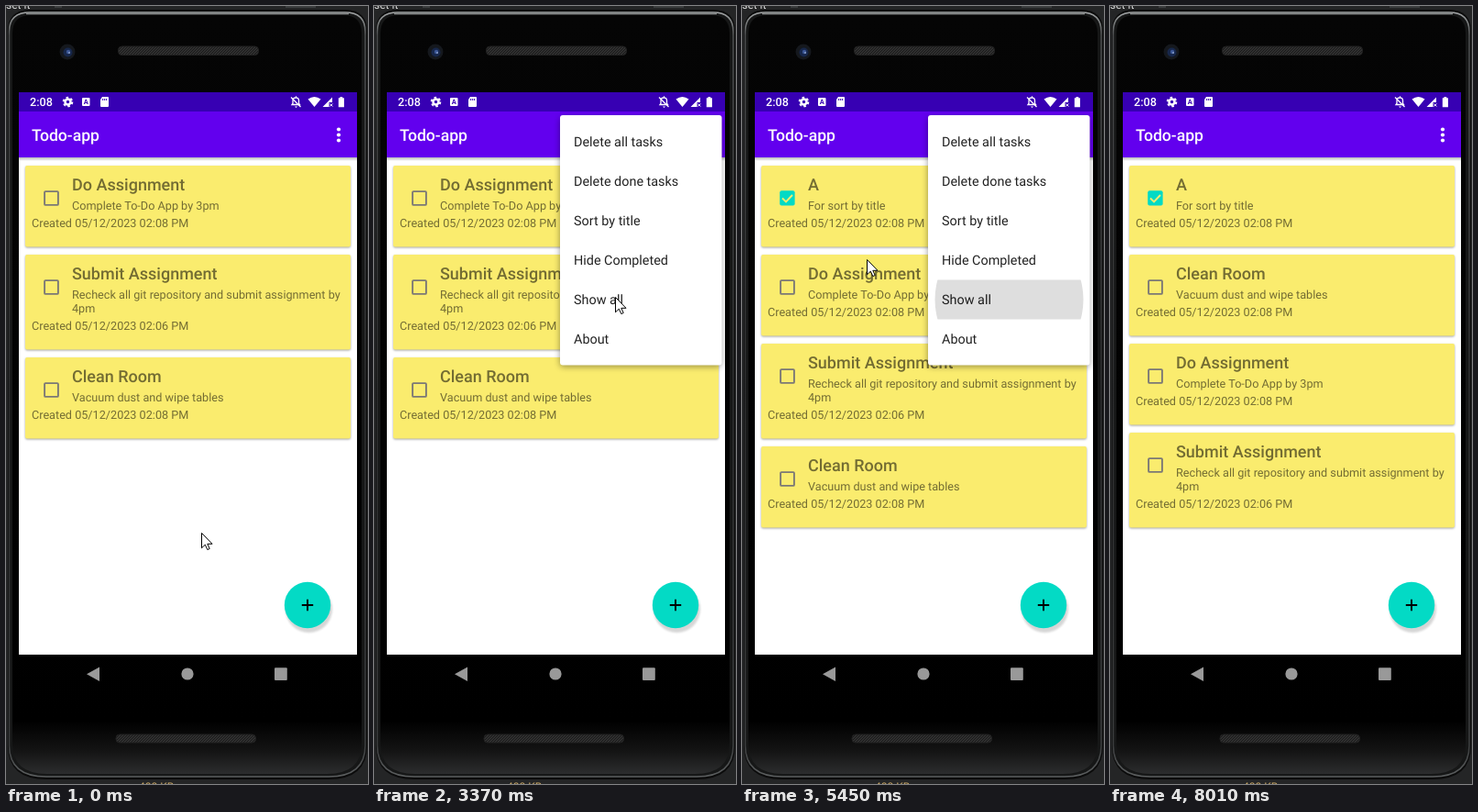
An HTML page for the animation above (8.29 s loop, 395 by 848 pixels).

```html
<!DOCTYPE html>
<html lang="en">
<head>
<meta charset="utf-8">
<title>Todo list</title>
<style>
html, body { margin: 0; width: 100%; height: 100%; overflow: hidden; background: #242526; }
svg { font-family: Roboto, sans-serif; text-rendering: geometricPrecision; }
body > svg { display: block; width: 395px; height: 848px; }
.title { font-size: 18px; font-weight: 500; }
.body { font-size: 12.66px; }
.item { font-size: 14.4px; fill-opacity: .87; }
</style>
</head>
<body>
<svg viewBox="0 0 395 848">
  <defs>
    <linearGradient id="rim" x1="0" y1="0" x2="0" y2="1">
      <stop offset="0" stop-color="#a2a5a6"/><stop offset=".03" stop-color="#4b4d4e"/>
      <stop offset=".5" stop-color="#2c2d2e"/><stop offset=".96" stop-color="#3b3d3e"/>
      <stop offset="1" stop-color="#5c5f60"/>
    </linearGradient>
    <linearGradient id="glass" x1="0" y1="0" x2="0" y2="1">
      <stop offset="0" stop-color="#050505"/><stop offset=".93" stop-color="#000"/>
      <stop offset=".97" stop-color="#141414"/><stop offset="1" stop-color="#2c2d2e"/>
    </linearGradient>
    <linearGradient id="drop" x1="0" y1="0" x2="0" y2="1">
      <stop offset="0" stop-opacity=".28"/><stop offset="1" stop-opacity="0"/>
    </linearGradient>
    <pattern id="mesh" width="3" height="3" patternUnits="userSpaceOnUse">
      <rect width="3" height="3" fill="#303030"/><path d="M0 3L3 0" stroke="#191919"/>
    </pattern>
    <filter id="soft" x="-20%" y="-20%" width="140%" height="150%"><feGaussianBlur stdDeviation=".9"/></filter>
    <filter id="wide" x="-20%" y="-20%" width="140%" height="140%"><feGaussianBlur stdDeviation="3.5"/></filter>
    <clipPath id="opening"><rect x="255" y="119" width="126" height="127" rx="2"/></clipPath>
  </defs>

  <rect width="395" height="848" fill="#242526"/>
  <text x="0" y="3" font-size="12" fill="#ddd">set it</text>
  <text x="145" y="855" font-size="12" fill="#c9a765">400 KB</text>
  <path d="M2 28Q2 4 26 4H370Q394 4 394 28V806Q394 843 352 843H44Q2 843 2 806Z" fill="#0b0b0b"/>
  <path d="M3.5 28Q3.5 7 26 7H370Q392 7 392 28V806Q392 840 352 840H44Q3.5 840 3.5 806Z" fill="#161717" stroke="url(#rim)" stroke-width="1.6"/>
  <path d="M7 30Q7 10 27 10H368Q388 10 388 30V804Q388 837 350 837H45Q7 837 7 804Z" fill="url(#glass)"/>
  <path d="M22 8.5H374" stroke="#858888" stroke-width="1.5"/>
  <path d="M53 1h8M305 1h33" stroke="#3c3e3f" stroke-width="2"/>

  <circle cx="67" cy="50" r="8.5" fill="#15181d"/>
  <circle cx="67.5" cy="50.5" r="5" fill="#17274b"/>
  <circle cx="68" cy="50" r="2.2" fill="#3c5796"/>
  <circle cx="69" cy="51" r=".8" fill="#c5d3f2"/>
  <rect x="122.5" y="44" width="153" height="9.5" rx="4" fill="url(#mesh)" stroke="#202020"/>
  <rect x="120" y="794" width="152.5" height="9" rx="4" fill="url(#mesh)" stroke="#202020"/>

  <rect x="14" y="94" width="369" height="613" fill="#fff"/>
  <rect x="14" y="165" width="369" height="4" fill="url(#drop)"/>
  <rect x="14" y="94" width="369" height="21" fill="#3700b3"/>
  <rect x="14" y="115" width="369" height="50" fill="#6200ee"/>

  <g fill="#fff">
    <text x="26" y="109" font-size="12.6" font-weight="500">2:08</text>
    <circle cx="67.5" cy="104.5" r="3" fill="none" stroke="#fff" stroke-width="2.5"/>
    <circle cx="67.5" cy="104.5" r="4.8" fill="none" stroke="#fff" stroke-width="2" stroke-dasharray="2.5 2.526"/>
    <rect x="83" y="100" width="8.5" height="9" rx="1"/>
    <text x="87.2" y="107.2" font-size="7.5" font-weight="700" text-anchor="middle" fill="#3700b3">A</text>
    <path d="M105 99h6q1 0 1 1v9q0 1-1 1h-7q-1 0-1-1v-7z"/>
    <path d="M105.7 101v2M107.7 101v2M109.7 101v2" stroke="#3700b3"/>
    <path d="M312 107.5h8.5l-1-1.5v-3q0-3-3.3-3.2q-3.2.2-3.2 3.2v3z" fill="none" stroke="#fff" stroke-width="1.3"/>
    <path d="M315 109.5h3l-1.5 1.5zM316 98.3h1v1.5h-1z"/>
    <path d="M311 99.5l10.5 10.5" stroke="#fff" stroke-width="1.2"/>
    <path d="M329.5 101.5q7-5 14 0l-7 8.5z"/>
    <path d="M345.5 110L356 99.5V105h-3.5v5z"/>
    <path d="M353.3 106.5l3 3m0-3l-3 3" stroke="#fff"/>
    <path d="M362.8 100.3h1.7V99h2.7v1.3h1.7v10h-6.1z"/>
    <text x="28" y="147" font-size="17.6" font-weight="500">Todo-app</text>
    <circle id="glow" cx="362.5" cy="140" r="17.5" opacity=".2"/>
    <circle cx="363" cy="134.5" r="2.1"/><circle cx="363" cy="140.5" r="2.1"/><circle cx="363" cy="146.5" r="2.1"/>
  </g>

  <g id="list"></g>

  <circle cx="330.5" cy="657.5" r="25.5" opacity=".16" filter="url(#soft)"/>
  <circle cx="329" cy="653" r="25.2" fill="#03dac5"/>
  <path d="M322.8 653h12.4M329 646.8v12.4" stroke="#000" stroke-width="1.9"/>
  <g fill="#999">
    <path d="M88 728.3L102 720.5V736z"/><circle cx="198" cy="728" r="6.6"/>
    <rect x="293" y="721.3" width="13.8" height="13.6" rx="1"/>
  </g>

  <g id="menu"></g>
  <path id="cursor" d="M.5.5V16.8L4.3 13.2L6.8 18.6L9.2 17.5L6.8 12.3H12z" fill="#fff" stroke="#000" stroke-width="1"/>
</svg>
<script>
const LOOP = 8290;
const STEP = 135; // the screen refreshes once per step; all times below count steps
const $ = id => document.getElementById(id);

const tasks = {
  a: { title: "A", lines: ["For sort by title"], time: "02:08", done: true },
  assign: { title: "Do Assignment", lines: ["Complete To-Do App by 3pm"], time: "02:08" },
  submit: { title: "Submit Assignment", lines: ["Recheck all git repository and submit assignment by", "4pm"], time: "02:06" },
  clean: { title: "Clean Room", lines: ["Vacuum dust and wipe tables"], time: "02:08" }
};
const pending = ["assign", "submit", "clean"];
const all = ["a", ...pending];
const sorted = ["a", "clean", "assign", "submit"];
const lists = [[0, pending], [29, all], [35, pending], [40, all], [42, sorted]];

const items = ["Delete all tasks", "Delete done tasks", "Sort by title", "Hide Completed", "Show all", "About"];
const HIDE = 3, SHOW = 4;
const visits = [
  { open: 20, fade: 28, row: SHOW },
  { open: 31, fade: 34, row: HIDE },
  { open: 37, fade: 41, row: SHOW }
];

// Pointer stops: arrival, departure, place
const dots = [372, 131], showAll = [263, 317], hide = [299, 284];
const stops = [
  [0, 0, [213, 574]], [8, 8, [66, 201]], [11, 11, [66, 410]], [16, 16, [357, 140]],
  [18, 20, dots], [24, 28, showAll], [30, 31, dots], [33, 35, hide],
  [36, 37, dots], [39, 39, showAll], [40, 40, [136, 276]], [43, 43, [92, 234]],
  [45, 45, [31, 190]], [47, 47, [106, 201]], [50, 50, [63, 179]], [58, 58, [349, 782]]
];
const LEAVE = 59;

const label = (x, y, kind, text) => `<text x="${x}" y="${y}" class="${kind}">${text}</text>`;

function card(task, y) {
  const extra = 15 * (task.lines.length - 1), h = 88.5 + extra;
  const box = task.done
    ? `<rect x="41.2" y="${y + 27.2}" width="16.4" height="16.4" rx="2" fill="#03dac5"/>
       <path d="M44 ${y + 35.5}l4 4l7-7.5" fill="none" stroke="#faec6e" stroke-width="1.9"/>`
    : `<rect x="42.1" y="${y + 28.1}" width="14.8" height="14.8" rx="1" fill="none" stroke="#7b7876" stroke-width="1.9"/>`;
  return `<rect x="21" y="${y + 1}" width="355" height="${h}" rx="2" opacity=".35" filter="url(#soft)"/>
    <rect x="21" y="${y}" width="355" height="${h}" rx="2" fill="#faec6e"/>${box}
    <g fill-opacity=".54">${label(72, y + 27, "title", task.title)}
    ${task.lines.map((s, i) => label(72, y + 48 + 14.7 * i, "body", s)).join("")}
    ${label(28, y + 67 + extra, "body", `Created 05/12/2023 ${task.time} PM`)}</g>`;
}

function list(names) {
  let y = 174;
  return names.map(name => {
    const svg = card(tasks[name], y);
    y += 82 + 15 * tasks[name].lines.length;
    return svg;
  }).join("");
}

const rows = () => items.map((s, i) => label(218, 153 + 43 * i, "item", s)).join("");

const openingMenu = () => `<g opacity=".86">
  <rect x="255" y="121" width="126" height="127" rx="2" opacity=".3" filter="url(#soft)"/>
  <g clip-path="url(#opening)"><rect x="255" y="119" width="126" height="127" fill="#fff"/>
  <g transform="translate(26 -73)">${rows()}</g></g></g>`;

function menu({ fade, row }, step) {
  const fading = step === fade;
  const ripple = step < fade - 2 ? 0 : 102 - 21 * (fade - step);
  return `<g opacity="${fading ? .66 : 1}">
    <rect x="203" y="122" width="176" height="271" rx="3" opacity=".4" filter="url(#wide)"/>
    <rect x="203" y="119" width="176.5" height="272.5" rx="3" fill="${fading ? "#f1f1f1" : "#fff"}"/>
    <svg x="203" y="${126.5 + 43 * row + 172 * 0}" width="176.5" height="43">
      <circle cx="88.5" cy="21.5" r="${ripple}" fill="${fading ? "#d2d2d2" : "#dedede"}"/></svg>${rows()}</g>`;
}

function pointer(step) {
  const i = stops.findLastIndex(([arrive]) => arrive <= step);
  const [, leave, from] = stops[i];
  const [arrive, , to] = stops[i + 1] || stops[i];
  if (step <= leave || arrive <= leave) return from;
  const k = (step - leave) / (arrive - leave);
  const ease = k * k * (3 - 2 * k);
  return from.map((v, n) => Math.round(v + (to[n] - v) * ease));
}

let last, shown;
function draw(t) {
  const step = Math.floor(t / STEP);
  if (step === last) return;
  last = step;
  const names = lists.findLast(([from]) => from <= step)[1];
  if (names !== shown) $("list").innerHTML = list(shown = names);
  const visit = visits.find(v => v.open <= step && step <= v.fade);
  $("menu").innerHTML = !visit ? "" : step === visit.open ? openingMenu() : menu(visit, step);
  const glowing = visits.some(v => v.open - 2 <= step && step <= v.open);
  $("glow").setAttribute("visibility", glowing ? "visible" : "hidden");
  $("cursor").setAttribute("transform", `translate(${pointer(step)})`);
  $("cursor").setAttribute("visibility", step < LEAVE ? "visible" : "hidden");
}

const start = performance.now();
function loop() {
  draw((performance.now() - start) % LOOP);
  requestAnimationFrame(loop);
}
loop();
</script>
</body>
</html>
```
